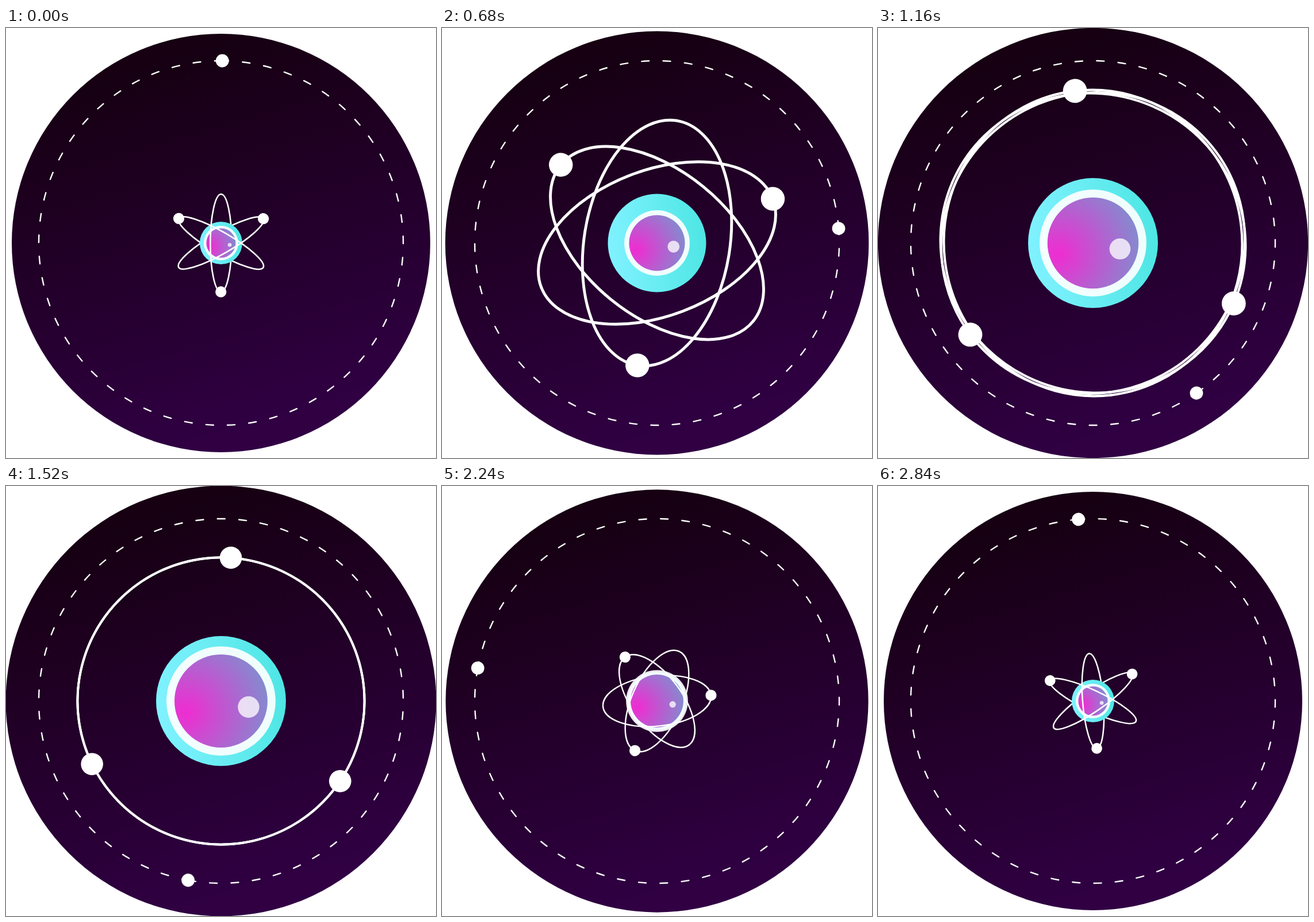
An HTML page that plays this animation: 748x748 px, repeating every 2880 ms.

```html
<!DOCTYPE html>
<html lang="en">
<head>
<meta charset="utf-8">
<title>Atom</title>
<style>
  html, body { margin: 0; width: 100%; height: 100%; overflow: hidden; background: #fff; }
  svg { display: block; width: 100vw; height: 100vh; }
</style>
</head>
<body>
<svg viewBox="0 0 748 748">
  <defs>
    <linearGradient id="night" x1=".36" y1=".06" x2=".62" y2=".94">
      <stop offset="0" stop-color="#160012"/>
      <stop offset="1" stop-color="#300043"/>
    </linearGradient>
    <linearGradient id="cyan" x1="0" y1=".55" x2="1" y2=".45">
      <stop offset="0" stop-color="#80f2ff"/>
      <stop offset="1" stop-color="#4ee6e4"/>
    </linearGradient>
    <radialGradient id="pink" cx=".12" cy=".62" r=".88">
      <stop offset=".05" stop-color="#eb30d1"/>
      <stop offset="1" stop-color="#8788cf"/>
    </radialGradient>
  </defs>
  <g transform="translate(374 374)">
    <circle id="disc" fill="url(#night)"/>
    <g id="track">
      <path d="M0-317A317 317 0 0 1 0 317A317 317 0 0 1 0-317" fill="none" stroke="#fff"
        stroke-width="2.4" stroke-linecap="round" stroke-dasharray="13 24.35" stroke-dashoffset=".5"/>
      <circle cx="1.6" cy="-317" r="11.4" fill="#fff"/>
    </g>
    <g id="back" fill="none" stroke="#fff" stroke-linecap="round"></g>
    <circle id="shell" fill="url(#cyan)"/>
    <g id="core">
      <circle r="95" fill="#fff" opacity=".91"/>
      <circle r="81" fill="url(#pink)"/>
      <circle id="glint" cx="48" cy="10.5" fill="#fff" opacity=".77"/>
    </g>
    <g id="front" fill="none" stroke="#fff" stroke-linecap="round"></g>
    <g id="electrons" fill="#fff"></g>
  </g>
</svg>
<script>
const LOOP = 2880;
const $ = id => document.getElementById(id);
const set = (el, attrs) => { for (const k in attrs) el.setAttribute(k, attrs[k]); };
const lerp = (a, b, k) => a + (b - a) * k;

// Ease in and out with power p.
function ease(x, p = 3) {
  x = Math.min(1, Math.max(0, x));
  return x < .5 ? (2 * x) ** p / 2 : 1 - (2 - 2 * x) ** p / 2;
}
// Eased rise from 0, mirrored so that it is back at 0 at `end`.
const swell = (t, end, rise) => ease(Math.min(t, end - t) / rise);

// Smooth monotone curve through [time, value] keys; grows by `gain` each loop.
function curve(keys, gain = 0) {
  const shift = (p, n) => [p[0] + n * LOOP, p[1] + n * gain];
  const pts = [shift(keys[keys.length - 1], -1), ...keys, shift(keys[0], 1), shift(keys[1], 1)];
  const rate = i => (pts[i + 1][1] - pts[i][1]) / (pts[i + 1][0] - pts[i][0]);
  const slope = i => {
    const a = rate(i - 1), b = rate(i);
    return a * b > 0 ? 2 * a * b / (a + b) : 0;
  };
  return t => {
    let i = 1;
    while (i < pts.length - 3 && t >= pts[i + 1][0]) i++;
    const [t0, v0] = pts[i], [t1, v1] = pts[i + 1];
    const h = t1 - t0, u = (t - t0) / h, w = 1 - u;
    return w * w * (1 + 2 * u) * v0 + u * u * (3 - 2 * u) * v1
      + h * u * w * (w * slope(i) - u * slope(i + 1));
  };
}

const spin = curve([[0, 0], [480, 70.5], [560, 96.3], [880, 165.2], [1280, 176.1],
  [1520, 183.9], [1920, 193.2], [2240, 263.7], [2320, 289.5], [2840, 355.3]], 360);
const size = curve([[0, 9.7], [480, 19.4], [880, 21.6], [1520, 19.5],
  [1920, 13.5], [2240, 9.73], [2840, 9.45]]);
const glint = curve([[0, .56], [480, .8], [880, 1], [1520, 1],
  [1920, .73], [2240, .53], [2840, .56]]);

function add(parent, tag) {
  return $(parent).appendChild(document.createElementNS("http://www.w3.org/2000/svg", tag));
}
const orbits = [0, 1, 2].map(i => ({
  turn: 60 + 120 * i,
  back: add("back", "path"),
  front: add("front", "path"),
  electron: add("electrons", "circle")
}));

function draw(t) {
  set($("disc"), { r: 364 + 10.4 * swell(t, LOOP, 1440) });
  set($("track"), { transform: `rotate(${t / 8})` });

  const grow = Math.min(ease(t / 1226, 2.75), ease((2685 - t) / 1245));
  set($("shell"), { r: lerp(37, 113, grow) });
  set($("core"), { transform: `scale(${lerp(30, 95, swell(t, 2895, 1450)) / 95})` });
  set($("glint"), { r: 18.7 * glint(t) });

  const s = size(t);
  const open = Math.min(ease(t / 1497, 2.9), ease((2704 - t) / 1250, 2.5));
  const a = s * lerp(8.75, 12.82, open), b = s * lerp(1.91, 12.82, open);
  const half = side => `M0 ${-a}A${b} ${a} 0 0 ${side} 0 ${a}`;
  const width = s * lerp(.265, .19, open);
  for (const o of orbits) {
    const transform = `rotate(${o.turn + spin(t)})`;
    set(o.back, { d: half(0), transform, "stroke-width": width });
    set(o.front, { d: half(1), transform, "stroke-width": width });
    set(o.electron, { cy: -a, r: s * .99, transform });
  }
}

const start = performance.now();
function tick() {
  draw((performance.now() - start) % LOOP);
  requestAnimationFrame(tick);
}
tick();
</script>
</body>
</html>
```
